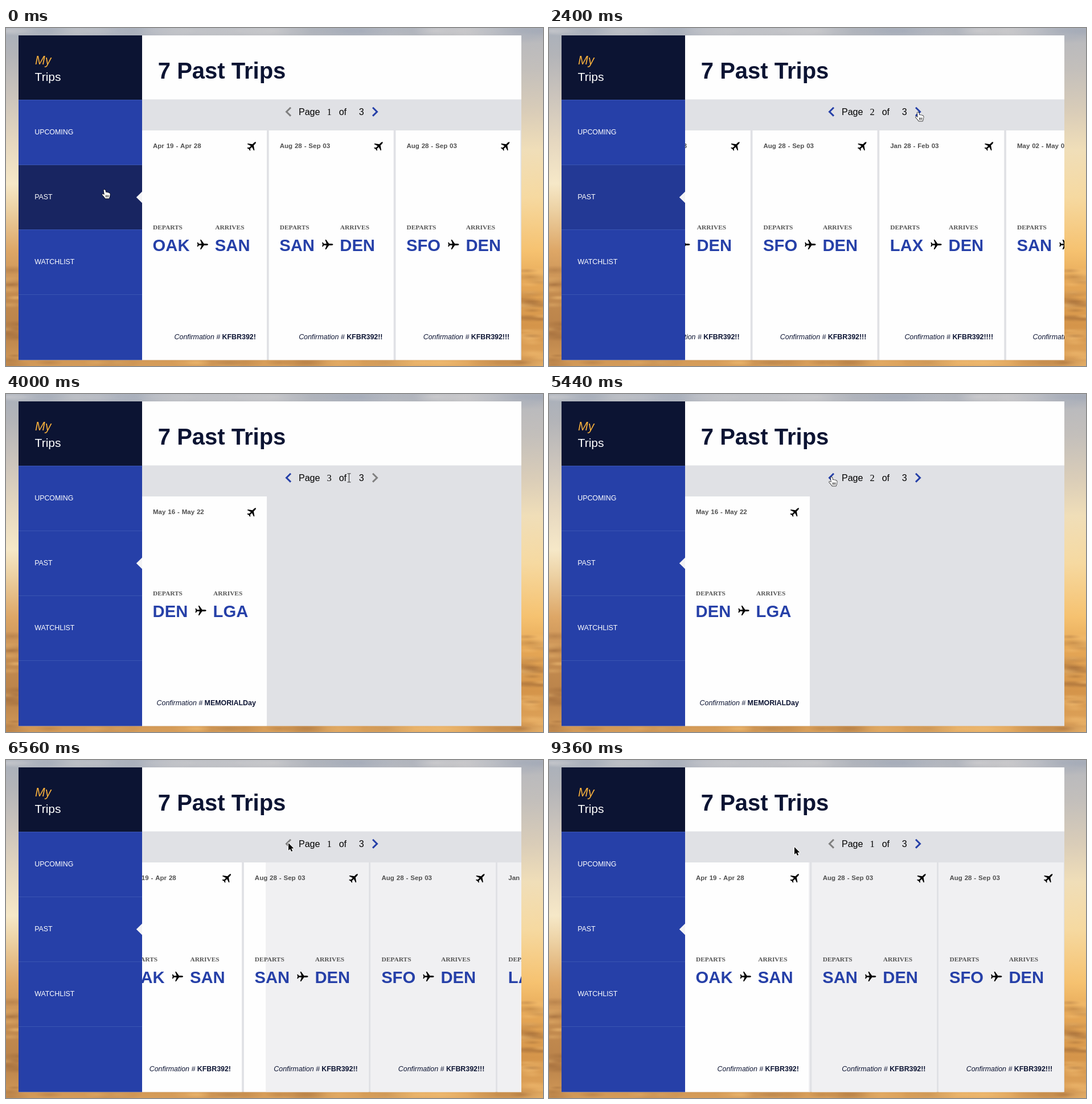
An HTML page with a canvas that plays this animation: 943x594 px, repeating every 9.44 s.

```html
<!DOCTYPE html>
<html lang="en">
<head>
<meta charset="utf-8">
<title>My Trips</title>
<style>
html, body { margin: 0; width: 100%; height: 100%; overflow: hidden; background: #c9a070; }
canvas { display: block; }
</style>
</head>
<body>
<canvas id="stage" width="943" height="594"></canvas>
<script>
const W = 943, H = 594, LOOP = 9440, STEP = 80;
const ctx = document.getElementById('stage').getContext('2d');
const SANS = '"Liberation Sans", Arial, sans-serif';
const SERIF = '"Liberation Serif", "Times New Roman", serif';
const BLUE = '#2640a8', NAVY = '#0c1433', GREY = '#e0e1e5', WHITE = '#fefefe';
const PANEL = { left: 22, top: 13, right: 905, bottom: 583.5, side: 239, bar: 126, list: 180 };
const PITCH = 222.7, CARD_W = 219, PAGE_W = PITCH * 3, SLIDE = 500;

const trips = [
  ['Apr 19 - Apr 28', 'OAK', 'SAN', 'KFBR392!'],
  ['Aug 28 - Sep 03', 'SAN', 'DEN', 'KFBR392!!'],
  ['Aug 28 - Sep 03', 'SFO', 'DEN', 'KFBR392!!!'],
  ['Jan 28 - Feb 03', 'LAX', 'DEN', 'KFBR392!!!!'],
  ['May 02 - May 06', 'SAN', 'LGA', '4THoFJULY'],
  ['Sep 02 - Sep 09', 'SFO', 'LGA', 'LABORDay'],
  ['May 16 - May 22', 'DEN', 'LGA', 'MEMORIALDay']
];

// time of click, page it leads to
const clicks = [[2256, 2], [3376, 3], [5440, 2], [6217, 1]];

// time, x, y of the pointer tip
const pointer = [
  [0, 173, 284], [560, 173, 284], [880, 392, 266], [960, 427, 254], [1200, 555, 199],
  [1440, 648, 148], [3760, 648, 148], [4560, 496, 146], [7200, 496, 146], [8000, 431, 153]
];

const clamp = v => Math.max(0, Math.min(1, v));
const mix = (a, b, k) => a + (b - a) * k;

// CSS "ease" curve, solved by bisection
function ease(x) {
  if (x <= 0 || x >= 1) return clamp(x);
  const bez = (a, b, s) => 3 * s * (1 - s) ** 2 * a + 3 * s * s * (1 - s) * b + s ** 3;
  let lo = 0, hi = 1;
  for (let i = 0; i < 24; i++) {
    const mid = (lo + hi) / 2;
    if (bez(.25, .25, mid) < x) lo = mid; else hi = mid;
  }
  return bez(.1, 1, lo);
}

function pager(t) {
  let page = 1, scroll = 0;
  for (const [at, next] of clicks) {
    if (t < at) break;
    scroll = mix(scroll, (next - 1) * PAGE_W, ease((t - at) / SLIDE));
    page = next;
  }
  return { page, scroll };
}

function pointerAt(t) {
  const i = pointer.findIndex(p => p[0] > t);
  if (i < 0) return pointer[pointer.length - 1].slice(1);
  const [t0, x0, y0] = pointer[i - 1], [t1, x1, y1] = pointer[i];
  const k = (t - t0) / (t1 - t0);
  return [mix(x0, x1, k), mix(y0, y1, k)];
}

function rect(x, y, w, h, fill) {
  ctx.fillStyle = fill;
  ctx.fillRect(x, y, w, h);
}

function text(str, x, y, font, fill, align = 'left') {
  ctx.font = font;
  ctx.fillStyle = fill;
  ctx.textAlign = align;
  ctx.fillText(str, x, y);
  return ctx.measureText(str).width;
}

function trace(points, closed) {
  ctx.beginPath();
  points.forEach(([x, y]) => ctx.lineTo(x, y));
  if (closed) ctx.closePath();
}

function makeSky() {
  const sky = document.createElement('canvas');
  sky.width = W;
  sky.height = H;
  const c = sky.getContext('2d');
  const column = stops => {
    const g = c.createLinearGradient(0, 0, 0, H);
    stops.forEach(([at, color]) => g.addColorStop(at, color));
    return g;
  };
  const west = column([[0, '#a9b0bb'], [.08, '#b3b4b8'], [.2, '#cbc4bc'], [.34, '#e6d8c0'],
    [.46, '#f6e8c8'], [.54, '#ecd0a2'], [.66, '#dda666'], [.78, '#c48c50'], [.9, '#b9824a'], [1, '#d39a58']]);
  const east = column([[0, '#b6b8be'], [.12, '#c3bfbb'], [.25, '#dacdb8'], [.36, '#f0deb8'],
    [.5, '#f6d9a0'], [.66, '#f6c270'], [.76, '#e5a655'], [.88, '#d5954a'], [1, '#e0a65e']]);
  c.fillStyle = east;
  c.fillRect(0, 0, W, H);
  c.fillStyle = west;
  for (let x = 0; x < W; x++) {
    c.globalAlpha = 1 - x / W;
    c.fillRect(x, 0, 1, H);
  }
  c.globalAlpha = 1;

  let seed = 7;
  const rnd = () => (seed = seed * 16807 % 2147483647) / 2147483647;
  const puff = (x, y, r, tone) => {
    c.save();
    c.translate(x, y);
    c.scale(1.7, .4);
    const g = c.createRadialGradient(0, 0, 0, 0, 0, r);
    g.addColorStop(0, `rgba(${tone},.3)`);
    g.addColorStop(1, `rgba(${tone},0)`);
    c.fillStyle = g;
    c.fillRect(-r, -r, r * 2, r * 2);
    c.restore();
  };
  for (let i = 0; i < 50; i++) {
    const x = rnd() < .5 ? rnd() * 22 : 905 + rnd() * 38;
    puff(x, mix(425, 594, rnd()), 8 + rnd() * 14, i % 2 ? '135,85,45' : '250,200,125');
  }
  for (let i = 0; i < 24; i++) {
    puff(rnd() * W, 588, 12 + rnd() * 24, i % 2 ? '150,98,52' : '250,200,125');
    puff(rnd() * W, 5, 20 + rnd() * 40, i % 2 ? '150,160,178' : '235,230,226');
  }
  return sky;
}
const sky = makeSky();

function plane(x, y, size, angle) {
  const half = [[10, -.4], [8.8, -1.2], [6.8, -1.5], [2.8, -1.5], [-2.2, -8.6], [-3.9, -8.6],
    [-1.5, -1.5], [-6, -1.3], [-7.8, -3.7], [-9.2, -3.7], [-8.3, 0]];
  ctx.save();
  ctx.translate(x, y);
  ctx.rotate(angle);
  ctx.scale(size / 20, size / 20);
  trace([...half, ...half.slice(0, -1).reverse().map(([px, py]) => [px, -py])], true);
  ctx.fillStyle = '#000';
  ctx.fill();
  ctx.restore();
}

function card([dates, from, to, code], left) {
  const x = left + 19, label = 'bold 11.4px ' + SERIF, city = 'bold 29.2px ' + SANS;
  ctx.wordSpacing = '0.7px';
  text(dates, x, 211, 'bold 11.5px ' + SANS, '#505050');
  ctx.wordSpacing = '0px';
  plane(x + 174, 207.2, 19, -Math.PI / 4);

  text('DEPARTS', x, 354, label, '#555');
  const w = text(from, x - .4, 392, city, BLUE);
  plane(x + w + 22, 380.5, 20, 0);
  text('ARRIVES', x + w + 44.4, 354, label, '#555');
  text(to, x + w + 44, 392, city, BLUE);

  const end = x + 180.8;
  const cw = text(code, end, 547, 'bold 12.4px ' + SANS, NAVY, 'right');
  text('Confirmation # ', end - cw, 547, 'italic 12.4px ' + SANS, NAVY, 'right');
}

function drawList(t, scroll) {
  const { side, list, right, bottom } = PANEL, h = bottom - list;
  ctx.save();
  ctx.beginPath();
  ctx.rect(side, list, right - side, h);
  ctx.clip();
  trips.forEach((trip, i) => {
    const x = side + i * PITCH - scroll;
    if (x > right || x + CARD_W < side) return;
    rect(x, list, CARD_W, h, WHITE);
    // cards stay slightly shaded on the right once the list has come back
    if (t > 5440) {
      const l = Math.max(x, 456);
      rect(l, list, Math.max(0, x + CARD_W - l), h, '#f0f0f2');
    }
    card(trip, x);
  });
  ctx.restore();
}

function chevron(x, dir, on) {
  trace([[x - 4 * dir, 139.8], [x + 3.5 * dir, 147.2], [x - 4 * dir, 154.6]]);
  ctx.strokeStyle = on ? BLUE : '#808080';
  ctx.lineWidth = 3;
  ctx.lineJoin = 'miter';
  ctx.lineCap = 'butt';
  ctx.stroke();
}

function drawPager(page) {
  const font = '16px ' + SANS;
  chevron(496, -1, page > 1);
  text('Page', 514, 153, font, '#000');
  text(page, 567.5, 153, '16.5px ' + SERIF, '#000', 'center');
  text('of', 584.7, 153, font, '#000');
  text('3', 619.7, 153, font, '#000');
  chevron(648, 1, page < 3);
}

function hoverColor(t) {
  const dark = [24, 37, 97], mid = [35, 57, 149], base = [38, 64, 168];
  const [a, b, k] = t < 2400
    ? [dark, mid, clamp((t - 1680) / 720)]
    : [mid, base, clamp((t - 2400) / 560)];
  return `rgb(${a.map((v, i) => Math.round(mix(v, b[i], k)))})`;
}

function drawSide(t) {
  const { left, top, side, bar, bottom } = PANEL, w = side - left;
  rect(left, top, w, bar - top, NAVY);
  text('My', 51, 64, 'italic 21.3px ' + SANS, '#f6b03d');
  text('Trips', 50.6, 93, '21px ' + SANS, '#fff');
  rect(left, bar, w, bottom - bar, BLUE);
  rect(left, 241, w, 113, hoverColor(t));
  ['UPCOMING', 'PAST', 'WATCHLIST'].forEach((name, i) => {
    const y = bar + i * 114;
    rect(left, y, w, 1, '#3a55b2');
    text(name, 50.2, y + 61, '12.4px ' + SANS, '#fff');
  });
  rect(left, bar + 3 * 114, w, 1, '#3a55b2');
  trace([[side, 287.5], [228.8, 297.5], [side, 307.5]], true);
  ctx.fillStyle = '#f3f3f5';
  ctx.fill();
}

const shapes = {
  arrow: [[0, 0], [0, 13], [2.9, 10.3], [5, 14.8], [7.2, 13.9], [5.2, 9.5], [9.2, 9.2]],
  hand: [[-1.5, .8], [0, 0], [1.4, .9], [2.4, 5], [4, 4.6], [5, 5.6], [6.5, 5.1], [7.5, 6.2],
    [9, 6.2], [9.8, 8], [9.2, 12], [8, 15.5], [1.4, 15.5], [-.8, 12.6], [-4, 9], [-3.4, 7.6], [-.2, 9]]
};

function cursorKind(x, y, page) {
  const inBar = y < 162;
  if (x < PANEL.side) return 'hand';
  if (inBar && x > 638) return page < 3 ? 'hand' : 'arrow';
  if (inBar && x > 487 && x < 504) return page > 1 ? 'hand' : 'arrow';
  if (inBar && x > 514 && x < 630) return 'beam';
  if (y > 195 && y < 214 && x > 480 && x < 570) return 'beam';
  return 'arrow';
}

function drawCursor(t, page) {
  const [x, y] = pointerAt(t), kind = cursorKind(x, y, page);
  ctx.save();
  ctx.translate(x, y);
  ctx.lineJoin = 'round';
  if (kind === 'beam') {
    rect(-.5, -7, 1, 14, '#222');
    rect(-3, -8, 6, 1, '#222');
    rect(-3, 7, 6, 1, '#222');
  } else {
    const hand = kind === 'hand';
    trace(shapes[kind], true);
    ctx.lineWidth = hand ? 1.3 : 2;
    ctx.strokeStyle = hand ? '#000' : '#fff';
    ctx.stroke();
    ctx.fillStyle = hand ? '#fff' : '#000';
    ctx.fill();
    if (hand) {
      ctx.fillStyle = '#000';
      [2, 4.2, 6.4].forEach(px => ctx.fillRect(px, 9.5, .9, 4));
    }
  }
  ctx.restore();
}

function draw(t) {
  const { left, top, right, bottom, side, bar } = PANEL;
  const { page, scroll } = pager(t);
  ctx.drawImage(sky, 0, 0);
  rect(left, top, right - left, bottom - top, GREY);
  rect(side, top, right - side, bar - top - .5, WHITE);
  text('7 Past Trips', 266.8, 89, 'bold 40px ' + SANS, NAVY);
  drawList(t, scroll);
  drawPager(page);
  drawSide(t);
  drawCursor(t, page);
}

const start = performance.now();
function tick() {
  const t = (performance.now() - start) % LOOP;
  draw(Math.floor(t / STEP) * STEP);
  requestAnimationFrame(tick);
}
tick();
</script>
</body>
</html>
```
